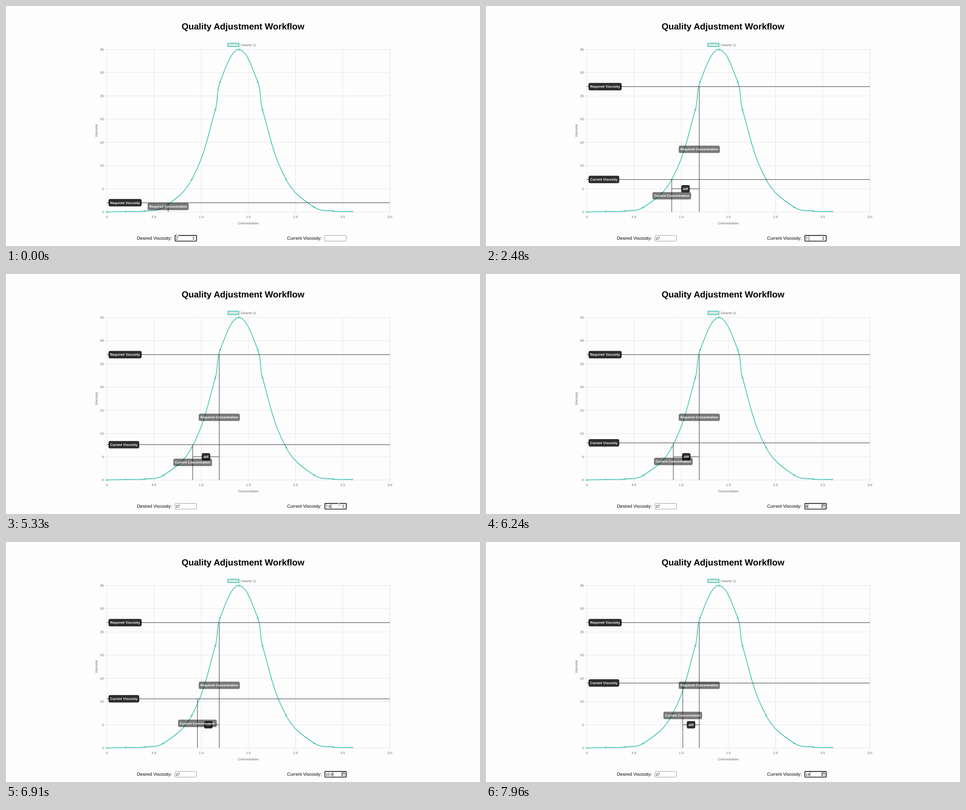
Write an HTML page that moves like this. It is 1052 by 532 pixels and loops after 7990 ms.

```html
<!DOCTYPE html>
<html lang="en">
<head>
<meta charset="utf-8">
<title>Quality Adjustment Workflow</title>
<style>
  html, body { margin: 0; width: 100%; height: 100%; overflow: hidden; background: #fdfdfd; }
  svg { display: block; font-family: "Liberation Sans", Arial, sans-serif; text-rendering: geometricPrecision; }
</style>
</head>
<body>
<svg id="stage" width="1052" height="532" viewBox="0 0 1052 532"></svg>
<script>
const LOOP = 7990;
const TEAL = '#52c7b8', GREY = '#666', LINE = '#56565a';
const SMALL = 7.36, BODY = 9.82, FIELD = 8.18;
const LEFT = 223.8, RIGHT = 852, TOP = 96.4, BOTTOM = 456.6;
const px = x => LEFT + x * (RIGHT - LEFT) / 3;
const py = y => BOTTOM - y * (BOTTOM - TOP) / 35;
const clamp = (v, lo, hi) => Math.max(lo, Math.min(hi, v));

const stage = document.getElementById('stage');

function set(node, attrs) {
  for (const key in attrs) node.setAttribute(key, attrs[key]);
  return node;
}
function add(tag, attrs, parent = stage) {
  return parent.appendChild(set(document.createElementNS('http://www.w3.org/2000/svg', tag), attrs));
}
function text(content, x, centerY, size, attrs = {}, parent = stage) {
  const node = add('text', { x, y: centerY + size * 0.35, 'font-size': size, ...attrs }, parent);
  node.textContent = content;
  return node;
}
function line(x1, y1, x2, y2, stroke, width) {
  return add('line', { x1, y1, x2, y2, stroke, 'stroke-width': width });
}
function show(node, visible) {
  node.style.display = visible ? '' : 'none';
}

// Heading, legend and axes
const middle = { 'text-anchor': 'middle' };
text('Quality Adjustment Workflow', 526, 44.8, 19.64, { ...middle, 'font-weight': 'bold' });
add('rect', { x: 492.4, y: 82.6, width: 24.6, height: 7.2, fill: '#dfe8e4', stroke: TEAL, 'stroke-width': 1.84 });
text('Cleaner Q', 520.8, 86, SMALL, { fill: GREY });

const GRID = '#e4e4ec';
for (let i = 0; i <= 6; i++) {
  const x = px(i / 2), y = py(i * 5) ;
  line(x, TOP, x, BOTTOM + 5, GRID, 0.9);
  text(i ? (i / 2).toFixed(1) : '0', x, 467.8, SMALL, { ...middle, fill: GREY });
  line(LEFT - 5, y, RIGHT, y, GRID, 0.9);
  text(i * 5, 217, y, SMALL, { 'text-anchor': 'end', fill: GREY });
}
line(LEFT - 5, TOP, RIGHT, TOP, GRID, 0.9);
text('35', 217, TOP, SMALL, { 'text-anchor': 'end', fill: GREY });
line(px(3), TOP, px(3), BOTTOM + 5, GRID, 0.9);
text('Concentration', (LEFT + RIGHT) / 2, 481.5, SMALL, { ...middle, fill: GREY });
text('Viscosity', 0, 0, SMALL, { ...middle, fill: GREY, transform: 'translate(200 276.3) rotate(-90)' });

// Data curve: cardinal spline with length-weighted control points
const data = [[0, 0], [.2, .1], [.4, .2], [.6, 1], [.9, 7], [1.15, 22], [1.2, 28], [1.4, 35],
  [1.6, 28], [1.65, 22], [1.9, 7], [2.2, 1], [2.4, .2], [2.6, .1]];
const points = data.map(([x, y]) => [px(x), py(y)]);
const distance = (a, b) => Math.hypot(a[0] - b[0], a[1] - b[1]);

function controls(i, tension = 0.4) {
  const p = points[i], prev = points[i - 1] || p, next = points[i + 1] || p;
  const before = distance(prev, p), after = distance(p, next);
  const at = k => [p[0] + k * (next[0] - prev[0]), clamp(p[1] + k * (next[1] - prev[1]), TOP, BOTTOM)];
  return { into: at(-tension * before / (before + after)), out: at(tension * after / (before + after)) };
}
let path = 'M' + points[0];
for (let i = 1; i < points.length; i++) {
  path += `C${controls(i - 1).out} ${controls(i).into} ${points[i]}`;
}
add('path', { d: path, fill: 'none', stroke: TEAL, 'stroke-width': 1.84 });
points.forEach(([cx, cy]) =>
  add('circle', { cx, cy, r: 1.84, fill: TEAL, 'fill-opacity': 0.4, stroke: TEAL, 'stroke-width': 0.7 }));

// Annotations
const annotationLine = () => line(0, 0, 0, 0, LINE, 1.25);
const lines = {
  requiredY: annotationLine(), currentY: annotationLine(), requiredX: annotationLine(),
  currentX: annotationLine(), diff: annotationLine()
};

function badge(content, opacity) {
  const group = add('g', {});
  const box = add('rect', { height: 16.4, y: -8.2, rx: 3.7, fill: '#000', 'fill-opacity': opacity }, group);
  const label = text(content, 0, 0, SMALL, { ...middle, fill: '#fff', 'font-weight': 'bold' }, group);
  const width = label.getComputedTextLength() + 7.4;
  set(box, { x: -width / 2, width });
  return { group, width, move: (x, y) => set(group, { transform: `translate(${x} ${y})` }) };
}
const badges = {
  requiredY: badge('Required Viscosity', 0.82),
  currentY: badge('Current Viscosity', 0.82),
  diff: badge('diff', 0.82),
  requiredX: badge('Required Concentration', 0.52),
  currentX: badge('Current Concentration', 0.52)
};

function concentration(viscosity) {
  const i = data.findIndex(p => p[1] >= viscosity);
  const [x0, y0] = data[i - 1], [x1, y1] = data[i];
  return x0 + (x1 - x0) * (viscosity - y0) / (y1 - y0);
}
function annotate(kind, viscosity) {
  const x = px(concentration(viscosity)), y = py(viscosity);
  set(lines[kind + 'Y'], { x1: LEFT, x2: RIGHT, y1: y, y2: y });
  set(lines[kind + 'X'], { x1: x, x2: x, y1: y, y2: BOTTOM });
  const label = badges[kind + 'Y'];
  label.move(LEFT + 3.7 + label.width / 2, y);
  badges[kind + 'X'].move(x, Math.min((y + BOTTOM) / 2, 444.4));
  return x;
}

// Form fields
function field(caption, captionX, x) {
  text(caption, captionX, 514.6, BODY);
  const box = add('rect', { x: x + .6, y: 508.6, width: 47.6, height: 12.6, rx: 1.4, fill: '#fff' });
  const value = text('', x + 2.3, 515.2, FIELD);
  const caret = add('rect', { y: 510.3, width: 0.8, height: 9.4 });
  const spinner = add('g', { transform: `translate(${x + 41.4} 515)` });
  const hover = add('rect', { x: -4.6, y: -4.6, width: 9.2, height: 8.4, fill: '#a2a2a2' }, spinner);
  add('path', { d: 'M-2.2-1.2L0-3.5L2.2-1.2ZM-2.2 1L0 3.3L2.2 1Z', fill: '#222' }, spinner);
  return (content, focused, caretOn, hovered) => {
    value.textContent = content;
    set(box, { stroke: focused ? '#101010' : '#808080', 'stroke-width': focused ? 1.6 : 0.8 });
    set(caret, { x: x + 2.6 + (content ? value.getComputedTextLength() : 0) });
    show(caret, caretOn);
    show(spinner, focused);
    show(hover, hovered);
  };
}
const drawDesired = field('Desired Viscosity:', 290.4, 374.7);
const drawCurrent = field('Current Viscosity:', 623.8, 707);

const pointer = add('path', {
  d: 'M0 0V7.6L1.8 6L3 8.6L4.2 8L3 5.6H5.2Z', fill: '#fff', stroke: '#888', 'stroke-width': 0.5
});

// Piecewise linear value of [time, value] keys
function track(keys, t) {
  const i = keys.findIndex(k => k[0] > t);
  if (i < 0) return keys[keys.length - 1][1];
  if (i === 0) return keys[0][1];
  const [t0, v0] = keys[i - 1], [t1, v1] = keys[i];
  return v0 + (v1 - v0) * (t - t0) / (t1 - t0);
}
const spin = [[6240, 8], [6525, 9], [6905, 10.6], [6985, 10.8], [7040, 11], [7365, 12], [7840, 13.6], [7955, 14], [7990, 14]];
const pointerX = [[4450, 384], [4920, 714], [5200, 714], [5325, 737], [5800, 748]];
const pointerY = [[4450, 483], [4920, 510], [5200, 510], [5325, 506], [5800, 512]];

function currentText(t) {
  if (t < 2300) return '';
  if (t < 2480) return '7';
  if (t < 3690) return '7.';
  if (t < 5940) return '7.6';
  if (t < 6240) return '7.8';
  return String(Math.floor(track(spin, t) * 5 + 1e-6) / 5);
}

function render(t) {
  const desired = t < 200 ? 2 : 27;
  const current = currentText(t);
  const onDesired = t < 500;
  const caretOn = (t >= 1850 && t < 2070) || (t >= 2300 && t < 3140) || t >= 3690;
  drawDesired(String(desired), onDesired, false, false);
  drawCurrent(current, !onDesired, caretOn, t >= 5600);

  const requiredX = annotate('required', desired);
  for (const key of ['currentX', 'currentY', 'diff']) {
    show(lines[key], current);
    show(badges[key].group, current);
  }
  if (current) {
    const currentX = annotate('current', parseFloat(current)), y = py(5);
    set(lines.diff, { x1: currentX, x2: requiredX, y1: y, y2: y });
    badges.diff.move((currentX + requiredX) / 2, y);
  }

  show(pointer, t < 200 || t >= 4450);
  const [x, y] = t < 200 ? [378, 503.5] : [track(pointerX, t), track(pointerY, t)];
  set(pointer, { transform: `translate(${x} ${y})` });
}

const start = performance.now();
function tick() {
  render((performance.now() - start) % LOOP);
  requestAnimationFrame(tick);
}
tick();
</script>
</body>
</html>
```
